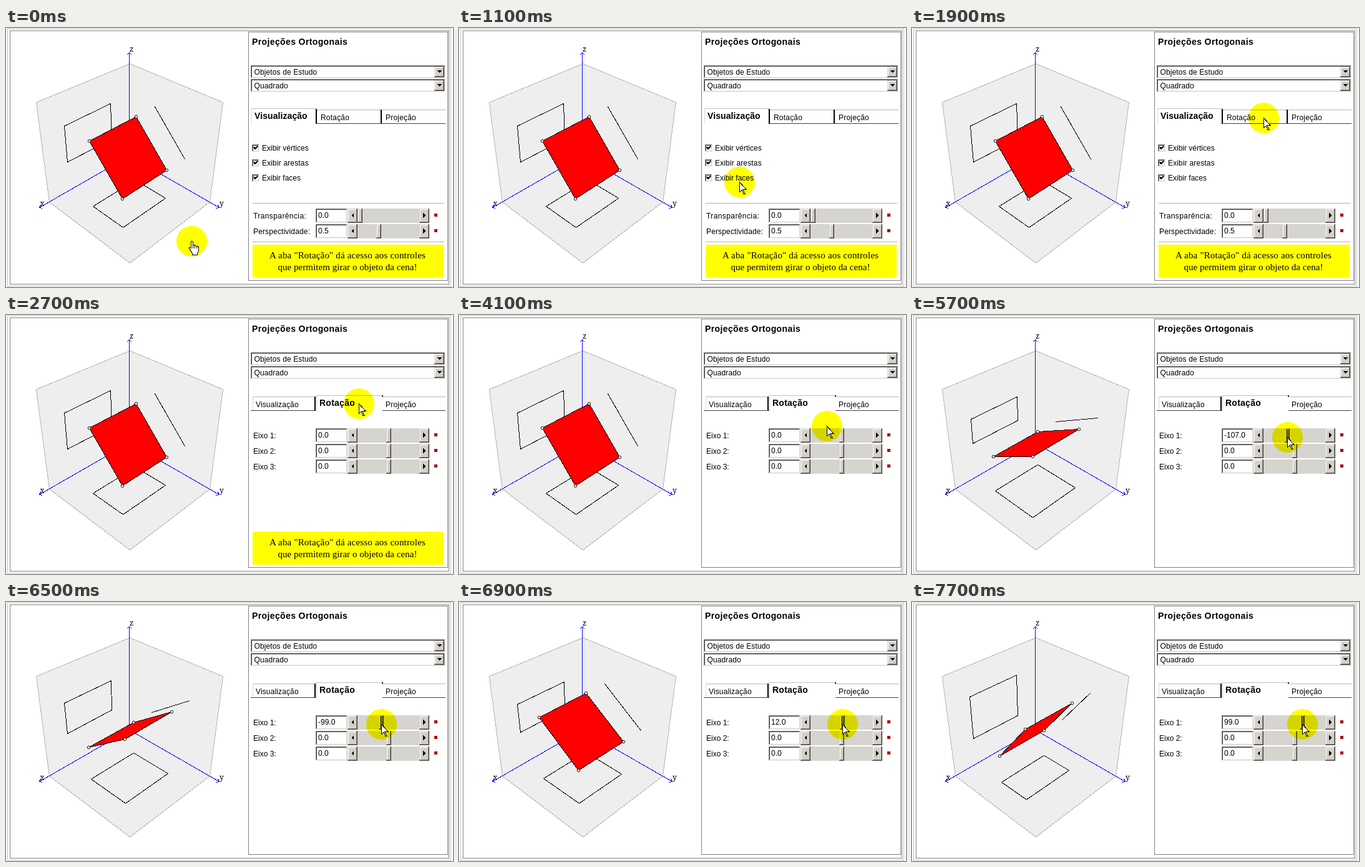
An HTML page for the animation above (8 s loop, 716 px wide and 416 px high).

```html
<!DOCTYPE html>
<html lang="pt">
<head>
<meta charset="utf-8">
<title>Projeções Ortogonais</title>
<style>
  html, body { margin: 0; width: 100%; height: 100%; overflow: hidden; background: #fff; }
  svg { display: block; position: absolute; left: 0; top: 0; shape-rendering: crispEdges; }
  text { font: 12px "Liberation Sans", Arial, sans-serif; white-space: pre; }
  .b { font-weight: bold; font-size: 14px; }
  .note { font: 15px "Liberation Serif", "Times New Roman", serif; text-anchor: middle; }
  .axis { font: 12px "Noto Serif", "Liberation Serif", serif; }
  .line { fill: none; stroke: #000; }
  .blue { fill: none; stroke: #00f; }
  #halo { fill: #ff0; mix-blend-mode: multiply; }
  .smooth { shape-rendering: auto; }
</style>
</head>
<body>
<svg id="stage" width="716" height="416" viewBox="0 0 716 416">
  <defs>
    <pattern id="hatch" width="2" height="2" patternUnits="userSpaceOnUse">
      <rect width="2" height="2" fill="#d4d0c8"/>
      <path d="M0 0h1v1h-1zM1 1h1v1h-1z"/>
    </pattern>
  </defs>
</svg>
<script>
const NS = 'http://www.w3.org/2000/svg';
const stage = document.getElementById('stage');
const FACE = '#d4d0c8', GREY = '#808080';

function add(parent, tag, attrs = {}, text) {
  const el = document.createElementNS(NS, tag);
  for (const k in attrs) el.setAttribute(k, attrs[k]);
  if (text !== undefined) el.textContent = text;
  return parent.appendChild(el);
}
const group = (parent = stage) => add(parent, 'g');
const box = (p, x, y, width, height, fill) => add(p, 'rect', { x, y, width, height, fill });
const path = (p, d, attrs) => add(p, 'path', { d, ...attrs });
const label = (p, x, y, s, gap = 0, cls = '') =>
  add(p, 'text', { x, y, class: cls, 'letter-spacing': gap }, s);
const frame = (p, x, y, w, h, stroke) =>
  add(p, 'rect', { x: x + .5, y: y + .5, width: w - 1, height: h - 1, fill: 'none', stroke });

// Two-tone bevels of the classic widgets
function bevel(p, x, y, w, h, fill, tones) {
  const [tl, tl2, br, br2] = tones;
  box(p, x, y, w, h, br);
  box(p, x, y, w - 1, h - 1, tl);
  box(p, x + 1, y + 1, w - 2, h - 2, br2);
  box(p, x + 1, y + 1, w - 3, h - 3, tl2);
  box(p, x + 2, y + 2, w - 4, h - 4, fill);
}
const raised = (p, x, y, w, h) => bevel(p, x, y, w, h, FACE, [FACE, '#fff', '#404040', GREY]);
const sunken = (p, x, y, w, h) => bevel(p, x, y, w, h, '#fff', [GREY, '#404040', '#eee', FACE]);

function combo(y, s) {
  sunken(stage, 392, y, 312, 21);
  raised(stage, 686, y + 2, 16, 17);
  path(stage, `M690 ${y + 8}h8l-4 4z`);
  label(stage, 397.5, y + 15, s, .12);
}

function check(p, y, s, gap) {
  sunken(p, 394, y, 12, 12);
  path(p, `M397 ${y + 4}l2 3l4 -4`, { class: 'line', 'stroke-width': 2 });
  label(p, 410, y + 10, s, gap);
}

function slider(p, y, s, gap, value, thumbX, thumbW) {
  label(p, 396, y + 16, s, gap);
  sunken(p, 496, y, 51, 23);
  const text = label(p, 500, y + 15, value);
  box(p, 547, y, 131, 23, '#d6d4ce');
  raised(p, 547, y, 16, 23);
  raised(p, 662, y, 16, 23);
  path(p, `M557 ${y + 7}v8l-4 -4zM668 ${y + 7}v8l4 -4z`);
  box(p, 686, y + 8, 5, 5, '#b00000');
  const thumb = group(p);
  raised(thumb, thumbX, y, thumbW, 23);
  return { text, thumb };
}

// Scene: isometric view with mild perspective, cube side 1, snapped to pixels
const K = .1213, R = 130.57, CX = 198, CY = 205.6, HALF = .264;
function project([x, y, z]) {
  const w = R / (1 - K * (x + y + z));
  return [CX + w * (y - x) * .866, CY + w * ((x + y) / 2 - z)].map(n => Math.floor(n) + .5);
}
const outline = pts => 'M' + pts.map(p => project(p).join(' ')).join('L') + 'z';

box(stage, 0, 0, 716, 416, '#fff');
frame(stage, 2, 1, 711, 414, '#c0c0c0');
frame(stage, 6, 4, 704, 408, GREY);

path(stage, outline([[0, 0, 1], [0, 1, 1], [0, 1, 0], [1, 1, 0], [1, 0, 0], [1, 0, 1]]),
  { fill: '#eee', stroke: '#b4b4b4' });
path(stage, 'M197.5 205.5L53.5 288.5M197.5 205.5L341.5 288.5M197.5 205.5V40', { class: 'blue' });
path(stage, 'M193.5 43.5l4 -4l4 4M55.500 284.5l-2 4l5 1M339.5 284.5l2 4l-5 1', { class: 'blue' });
label(stage, 198, 38, 'z', 0, 'axis');
label(stage, 54.5, 286, 'x', 0, 'axis');
label(stage, 342, 286, 'y', 0, 'axis');

const shadows = [0, 1, 2].map(() => path(stage, '', { class: 'line' }));
const face = path(stage, '', { fill: '#f00', stroke: '#000' });
const dots = [0, 1, 2, 3].map(() =>
  add(stage, 'circle', { r: 2.2, fill: '#fff', stroke: '#000', class: 'smooth' }));

function drawSquare(angle) {
  const phi = (angle - 45) * Math.PI / 180;
  const corner = (sx, t) =>
    [.5 + sx * HALF, .5 + t * HALF * Math.cos(phi), .5 + t * HALF * Math.sin(phi)];
  const pts = [corner(1, -1), corner(-1, -1), corner(-1, 1), corner(1, 1)];
  shadows.forEach((s, axis) =>
    s.setAttribute('d', outline(pts.map(p => p.map((c, i) => i === axis ? 0 : c)))));
  face.setAttribute('d', outline(pts));
  dots.forEach((d, i) => {
    const [x, y] = project(pts[i]);
    d.setAttribute('cx', x);
    d.setAttribute('cy', y);
  });
}

// Control panel
box(stage, 388, 6, 320, 400, '#fff');
frame(stage, 388, 6, 320, 400, GREY);
label(stage, 394, 27, 'Projeções Ortogonais', .38, 'b');
combo(60, 'Objetos de Estudo');
combo(82, 'Quadrado');
label(stage, 608, 148, 'Projeção', .2);
box(stage, 603, 131, 101, 1, '#b8b8b8');

const view = group();
box(view, 393, 129, 104, 1, '#c0c0c0');
box(view, 393, 129, 1, 24, '#d8d8d8');
box(view, 496, 130, 2, 24, '#000');
box(view, 498, 131, 102, 1, '#b8b8b8');
box(view, 600, 131, 2, 23, '#000');
box(view, 497, 153, 207, 1, '#404040');
label(view, 398, 146, 'Visualização', .08, 'b');
label(view, 504, 148, 'Rotação', .2);
check(view, 187, 'Exibir vértices', 0);
check(view, 211, 'Exibir arestas', .15);
check(view, 235, 'Exibir faces', 0);
box(view, 395, 281, 307, 1, '#b0b0b0');
slider(view, 290, 'Transparência:', .4, '0.0', 563, 8);
slider(view, 315, 'Perspectividade:', .15, '0.5', 593, 8);
box(view, 395, 343, 307, 1, '#b0b0b0');

const turn = group();
box(turn, 395, 131, 99, 1, '#b8b8b8');
box(turn, 395, 131, 1, 22, '#d8d8d8');
box(turn, 494, 131, 2, 23, '#000');
box(turn, 392, 153, 105, 1, '#404040');
box(turn, 497, 129, 106, 1, '#c0c0c0');
box(turn, 497, 129, 1, 24, '#c0c0c0');
box(turn, 602, 129, 2, 2, '#000');
box(turn, 603, 153, 101, 1, '#404040');
label(turn, 400, 148, 'Visualização', .13);
label(turn, 502, 146, 'Rotação', .25, 'b');
const axis1 = slider(turn, 182, 'Eixo 1:', 0, '0.0', 609, 8);
slider(turn, 207, 'Eixo 2:', 0, '0.0', 609, 8);
slider(turn, 232, 'Eixo 3:', 0, '0.0', 609, 8);
const grip = box(turn, 611, 183, 5, 21, 'url(#hatch)');

const note = group();
box(note, 395, 348, 306, 53, '#ff0');
label(note, 547, 370, 'A aba "Rotação" dá acesso aos controles', .18, 'note');
label(note, 547, 389, 'que permitem girar o objeto da cena!', .04, 'note');

// Pointer
const halo = add(stage, 'circle', { id: 'halo', cx: .5, cy: .5, r: 24.5 });
const ink = { fill: '#fff', stroke: '#000' };
const arrow = path(stage, 'M.5 .5v16l3.5 -3.5l3 6.5h2l-3 -7h5z', ink);
const hand = group();
path(hand, 'M-.5 .5q2 -1 3 1v6q2 -1.5 3 .5q2 -1 3 1q2.5 -1 3 1.5v6l-2 3v3h-8v-3l-5 -7q-1 -3 3 -1z', ink);
path(hand, 'M2.5 8v4M5.5 9v3M8.5 10v2', ink);

// [ms, x, y]
const moves = [
  [0, 297, 342], [500, 310, 335], [700, 345, 313], [900, 397, 282], [1100, 449, 247],
  [1300, 495, 210], [1500, 533, 177], [1700, 553, 155], [1900, 563, 144], [2100, 564, 143],
  [2300, 565, 142], [3500, 566, 144], [3700, 571, 151], [3900, 579, 164], [4100, 589, 178],
  [4300, 601, 189], [4500, 612, 195]
];
// [ms, degrees]
const turns = [
  [0, 0], [4700, 4], [4900, -12], [5100, -36], [5300, -60], [5500, -83], [5700, -107],
  [5900, -123], [6100, -131], [6500, -99], [6700, -44], [6900, 12], [7100, 44],
  [7300, 75], [7500, 91], [7700, 99]
];
const LOOP = 8000, TAB = 2500, NOTE_END = 3500, DRAG = 4700;
const at = (table, t) => table.findLast(row => row[0] <= t);
const show = (el, on) => el.setAttribute('display', on ? 'inline' : 'none');
const place = (el, x, y = 0) => el.setAttribute('transform', `translate(${x} ${y})`);

function draw(t) {
  const angle = at(turns, t)[1], drag = t >= DRAG;
  const shift = Math.round(angle / 8.6);
  let [, x, y] = at(moves, t);
  if (drag) [x, y] = [613 + shift, 196];

  drawSquare(angle);
  show(view, t < TAB);
  show(turn, t >= TAB);
  show(note, t < NOTE_END);
  axis1.text.textContent = angle.toFixed(1);
  place(axis1.thumb, shift);
  place(grip, shift);
  show(grip, drag);

  for (const el of [halo, arrow, hand]) place(el, x, y);
  show(hand, x < 388);
  show(arrow, x >= 388);
}

const start = performance.now();
function tick() {
  draw((performance.now() - start) % LOOP);
  requestAnimationFrame(tick);
}
tick();
</script>
</body>
</html>
```
